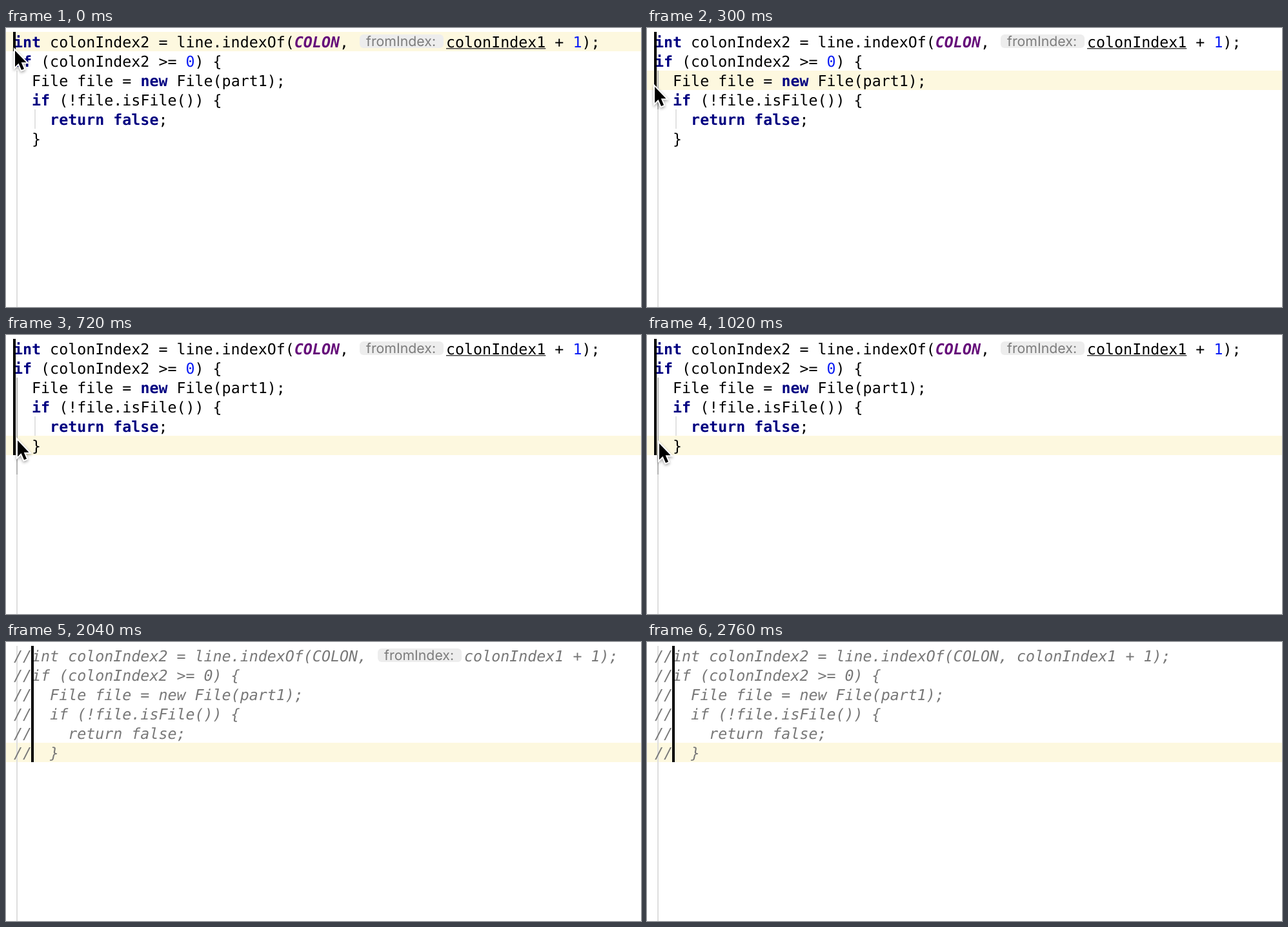
An HTML page that plays this animation: 984x432 px, repeating every 2880 ms.

```html
<!DOCTYPE html>
<html lang="en">
<head>
<meta charset="utf-8">
<title>Column selection and line comments</title>
<style>
  html, body { margin: 0; width: 100%; height: 100%; overflow: hidden; background: #fff; }
  svg { display: block; }
  text { font: 23.3px "DejaVu Sans Mono", monospace; white-space: pre; text-rendering: geometricPrecision; }
  .keyword { fill: #000080; font-weight: bold; }
  .number { fill: #0a1cf5; }
  .constant { fill: #660e7a; font-weight: bold; font-style: italic; }
  #comment text { fill: #787878; font-style: italic; }
  #hint text { font: 21.3px Inter, sans-serif; fill: #7c7c7c; }
  #mouse { filter: drop-shadow(0 2px 2px rgba(0, 0, 0, .35)); }
</style>
</head>
<body>
<svg width="984" height="432" viewBox="0 0 984 432">
  <rect id="row" width="984" height="30" fill="#fdf8df"/>
  <rect id="guide" x="16" width="2" fill="#dedede"/>
  <rect id="activeGuide" x="16" y="66" width="2" fill="#b4b4b4"/>
  <rect id="innerGuide" x="44" y="126" width="2" height="30" fill="#e2e2e2"/>
  <g id="code"></g>
  <g id="comment"></g>
  <svg id="hint" y="6" height="30">
    <rect id="hintBox" y="4" height="21" rx="6" fill="#ededed"/>
    <text x="10" y="22">fromIndex:</text>
  </svg>
  <rect id="caret" y="6" width="4"/>
  <path id="mouse" d="M0 0V25L5.5 19.7 10 30 14 28.3 9.7 18.3H17.5Z"
        stroke="#fff" stroke-width="4" paint-order="stroke"/>
</svg>
<script>
const LOOP = 2880, STEP = 60;
const LEFT = 12, TOP = 6, LINE = 30, BASELINE = 24, CHAR = 14.027;
const HINT_COLUMN = 38, HINT_SPACE = 137;
const CARET_OFF = 1320, COMMENTED = 1860;

const argument = "colonIndex1 + 1);";
const lines = [
  "int colonIndex2 = line.indexOf(COLON,",
  "if (colonIndex2 >= 0) {",
  "  File file = new File(part1);",
  "  if (!file.isFile()) {",
  "    return false;",
  "  }"
];

// Keyframes are [time, value] pairs.
const mouseX = [[0, 14], [180, 12], [420, 12], [600, 16], [780, 19], [1140, 19], [1380, 18]];
const mouseY = [[0, 35], [180, 65], [420, 117], [600, 154], [780, 168], [1140, 168], [1380, 165]];
const hintSpace = [[2160, HINT_SPACE], [2340, 2], [2400, 0]];

const el = id => document.getElementById(id);
const set = (id, attrs) => {
  for (const name in attrs) el(id).setAttribute(name, attrs[name]);
};
const show = (id, visible) => set(id, { visibility: visible ? "visible" : "hidden" });
const column = n => LEFT + n * CHAR;

function highlight(source) {
  return source.replace(/\b(int|if|new|return|false)\b|\b(COLON)\b|\b(\d+)\b|[<>]/g,
    (token, keyword, constant, number) => {
      if (token === ">") return "&gt;";
      if (token === "<") return "&lt;";
      const kind = keyword ? "keyword" : constant ? "constant" : "number";
      return `<tspan class="${kind}">${token}</tspan>`;
    });
}

const textAt = (x, row, markup, id = "") =>
  `<text id="${id}" x="${x}" y="${TOP + row * LINE + BASELINE}">${markup}</text>`;

const argumentX = column(HINT_COLUMN) + HINT_SPACE;
el("code").innerHTML =
  lines.map((line, row) => textAt(LEFT, row, highlight(line), "code" + row)).join("") +
  textAt(argumentX, 0, highlight(argument), "argument") +
  `<rect x="${argumentX}" y="31" width="${11 * CHAR}" height="1.5" fill="#444"/>`;
el("comment").innerHTML =
  lines.map((line, row) =>
    textAt(LEFT, row, "//" + line.replace(">", "&gt;"), "comment" + row)).join("") +
  textAt(0, 0, argument, "commentArgument");

function valueAt(keys, time) {
  const next = keys.findIndex(key => key[0] > time);
  if (next === 0) return keys[0][1];
  if (next < 0) return keys[keys.length - 1][1];
  const [t0, v0] = keys[next - 1], [t1, v1] = keys[next];
  return v0 + (v1 - v0) * (time - t0) / (t1 - t0);
}

function render(time) {
  const commented = time >= COMMENTED;
  const x = valueAt(mouseX, time), y = valueAt(mouseY, time);
  const row = Math.floor((y - TOP) / LINE);
  const rowTop = TOP + row * LINE;
  const space = valueAt(hintSpace, time);
  const hintX = column(HINT_COLUMN + (commented ? 2 : 0));
  const hintWidth = Math.max(0, space - 7);

  show("code", !commented);
  show("comment", commented);
  show("innerGuide", !commented);
  show("mouse", !commented);
  show("activeGuide", !commented && row >= 2);
  show("caret", time < CARET_OFF || commented);
  show("hint", hintWidth > 0);

  const guideTop = commented ? TOP : TOP + 2 * LINE;
  set("row", { y: rowTop });
  set("guide", { y: guideTop, height: 432 - guideTop });
  set("activeGuide", { height: Math.max(0, rowTop + 2 * LINE - 66) });
  set("caret", { x: commented ? 39 : 11, height: rowTop + LINE - TOP });
  set("mouse", { transform: `translate(${x} ${y})` });
  set("hint", { x: hintX + 3, width: hintWidth });
  set("hintBox", { width: hintWidth });
  set("commentArgument", { x: column(HINT_COLUMN + 2) + space });
}

function tick() {
  const time = performance.now() % LOOP;
  render(Math.floor(time / STEP) * STEP);
  requestAnimationFrame(tick);
}
tick();
</script>
</body>
</html>
```
